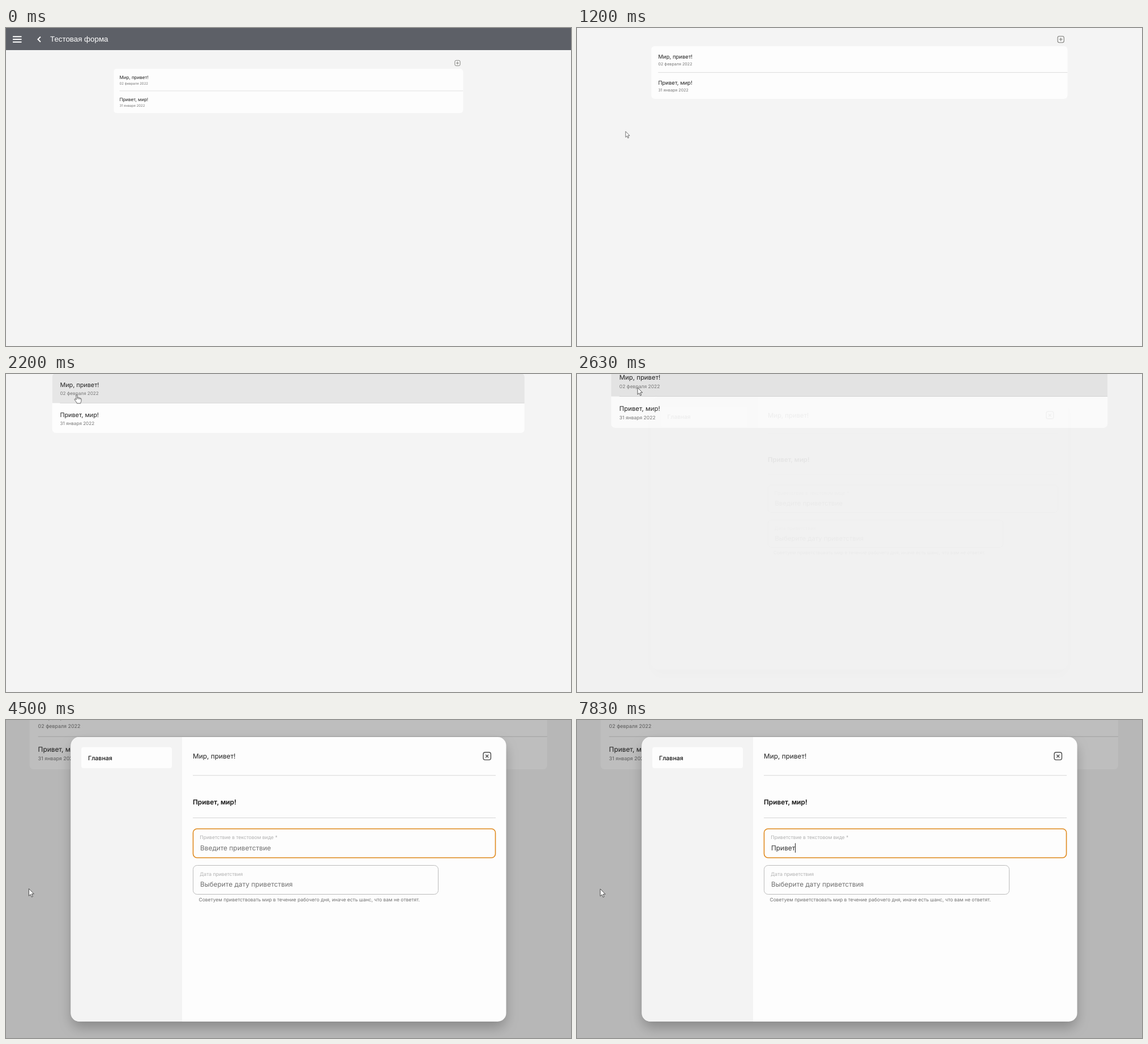
Write an HTML page that moves like this. It is 998x561 px and loops after 8 s.

```html
<!DOCTYPE html>
<html lang="ru">
<head>
<meta charset="utf-8">
<title>Тестовая форма</title>
<style>
  html, body { margin: 0; width: 100%; height: 100%; overflow: hidden; background: #f4f4f4; }
  svg { display: block; width: 998px; height: 561px; }
  text { font-family: Inter, "Open Sans", sans-serif; text-rendering: geometricPrecision; white-space: pre; }
  .title { font: 13.33px "Liberation Sans", Arial, sans-serif; fill: #fff; }
  .item { font-size: 8px; fill: #222; }
  .date { font-size: 6px; fill: #777; }
  .label { font-size: 8.6px; fill: #b0b0b0; }
  .hint { font-size: 11.9px; fill: #707070; }
  .line { stroke: #d6d6d6; }
  .box { fill: none; stroke: #bbb; }
</style>
</head>
<body>
<svg viewBox="0 0 998 561">
  <defs>
    <clipPath id="cardClip"><rect x="190.3" y="72" width="617" height="78" rx="5"/></clipPath>
    <clipPath id="modalClip"><rect x="114.5" y="30" width="769" height="502" rx="15"/></clipPath>
    <filter id="shadow" x="-10%" y="-10%" width="120%" height="125%">
      <feGaussianBlur stdDeviation="11"/>
    </filter>
  </defs>
  <rect width="998" height="561" fill="#f4f4f4"/>

  <g id="page">
    <rect width="998" height="39" fill="#5d6067"/>
    <path d="M12 15.2h15.5M12 20h15.5M12 24.8h15.5" stroke="#fff" stroke-width="1.9"/>
    <path d="M61 15.5l-4.6 4.5 4.6 4.5" fill="none" stroke="#fff" stroke-width="1.9"/>
    <text class="title" x="78" y="24">Тестовая форма</text>
    <g fill="none" stroke="#7c7c78" stroke-width=".9">
      <rect x="792.8" y="57.2" width="9.4" height="9.4" rx="2.4"/>
      <path d="M795 61.9h5M797.5 59.4v5"/>
    </g>
    <g clip-path="url(#cardClip)">
      <rect x="190" y="72" width="618" height="78" fill="#fdfdfd"/>
      <rect id="row0" x="190" y="72" width="618" height="39" fill="#e6e6e6"/>
      <rect id="row1" x="190" y="111" width="618" height="39" fill="#e6e6e6"/>
      <path class="line" d="M200.5 110.9H808" stroke-width=".7"/>
    </g>
    <text class="item" x="200.5" y="90">Мир, привет!</text>
    <text class="date" x="200.5" y="100.4">02 февраля 2022</text>
    <text class="item" x="200.5" y="129">Привет, мир!</text>
    <text class="date" x="200.5" y="139.4">31 января 2022</text>
  </g>

  <rect id="shade" width="998" height="561"/>

  <g id="modal">
    <rect x="116" y="42" width="766" height="500" rx="15" fill-opacity=".26" filter="url(#shadow)"/>
    <g clip-path="url(#modalClip)">
      <rect x="114" y="30" width="770" height="502" fill="#fdfdfd"/>
      <rect x="114" y="30" width="197" height="502" fill="#f3f3f3"/>
    </g>
    <rect x="133" y="48" width="160" height="37" rx="4" fill="#fdfdfd"/>
    <text x="145" y="70.6" font-size="10.6" font-weight="500" fill="#111">Главная</text>
    <text x="330" y="68" font-size="11.85" fill="#222">Мир, привет!</text>
    <g fill="none" stroke="#4a4a4a" stroke-width="1.4">
      <rect x="843" y="57" width="13.4" height="13.4" rx="3.4"/>
      <path d="M847.2 61.2l5 5m0-5l-5 5"/>
    </g>
    <path class="line" d="M330 97.8H865M330 172.6H865"/>
    <text x="330" y="149.2" font-size="11.85" font-weight="600" fill="#111">Привет, мир!</text>

    <rect id="field" class="box" x="330.5" y="192" width="534" height="51" rx="7"/>
    <text class="label" x="342.3" y="210.3">Приветствие в текстовом виде *</text>
    <text id="value" class="hint" x="343" y="229.8"></text>
    <path id="caret" stroke="#222"/>

    <rect class="box" x="330.5" y="256.5" width="433" height="51" rx="7"/>
    <text class="label" x="342.3" y="275">Дата приветствия</text>
    <text class="hint" x="343" y="294.3">Выберите дату приветствия</text>
    <text x="340.5" y="319.6" font-size="8.5" fill="#707070">Советуем приветствовать мир в течение рабочего дня, иначе есть шанс, что вам не ответят.</text>
  </g>

  <g id="mouse" fill="#fff" stroke="#333" stroke-width="1.1" stroke-linejoin="round">
    <path id="arrow" d="M0 0V16.5L3.8 13 6.4 19 9 17.9 6.4 12H11.6Z"/>
    <path id="hand" d="M-1.5 1.2C-1.5-.8 1.7-.8 1.7 1.2V7.5C2.4 6.2 4.8 6.4 5 8 6 7 8 7.3 8.2 9 9.3 8.2 11.2 8.8 11.2 10.4V15.5C11.2 18 9.6 18.6 9.4 21.5H.4C0 18.5-3.4 16-5.4 12.4-6.4 10.2-3.6 9.6-2.6 11.2L-1.5 12.6ZM1.7 7.5V11M5 8V11.3M8.2 9V11.6"/>
    <path id="beam" d="M-3-8H-1L0-7 1-8H3M0-7V7M-3 8H-1L0 7 1 8H3" fill="none"/>
  </g>
</svg>
<script>
const LOOP = 8000, CX = 499, CY = 280.5, ZOOM = 1.482;
const FADE = 2600, CLICK = 3970, BLINK = 500;
const WORD = 'Привет', KEYS = [5700, 6030, 6270, 6570, 6900, 7470];

// pointer track in unzoomed page units: time, x, y
const TRACK = [
  [640, -20, 392], [850, 40, 350], [1120, 140, 215], [1450, 221, 104],
  [1670, 221, 102.5], [2300, 222.5, 100], [2630, 223.2, 100], [2870, 220, 115.3],
  [3150, 300, 200], [3700, 447, 241], [4060, 449, 242], [4430, 189.5, 292], [4800, 190, 292.3]
];

const $ = id => document.getElementById(id);
const clamp = v => Math.min(1, Math.max(0, v));
const ease = v => v * v * (3 - 2 * v);
const ramp = (t, from, to) => ease(clamp((t - from) / (to - from)));
const show = (id, on) => $(id).setAttribute('visibility', on ? 'visible' : 'hidden');
const zoomTo = (id, k) =>
  $(id).setAttribute('transform', `translate(${CX} ${CY}) scale(${k}) translate(${-CX} ${-CY})`);

function pointer(t) {
  let i = 0;
  while (i < TRACK.length - 2 && t > TRACK[i + 1][0]) i++;
  const [t0, x0, y0] = TRACK[i], [t1, x1, y1] = TRACK[i + 1];
  const p = ramp(t, t0, t1);
  return [x0 + (x1 - x0) * p, y0 + (y1 - y0) * p];
}

function drawField(t) {
  const focused = t >= CLICK;
  const typed = KEYS.filter(k => t >= k).length;
  const value = $('value');
  value.textContent = typed ? WORD.slice(0, typed) : 'Введите приветствие';
  value.style.fill = typed ? '#333' : '';
  $('field').style.stroke = focused ? '#e08a1e' : '';
  $('field').style.strokeWidth = focused ? 1.6 : 1;

  const since = t - (typed ? KEYS[typed - 1] : CLICK);
  const x = 343.3 + (typed ? value.getComputedTextLength() : 0);
  $('caret').setAttribute('d', `M${x} 217.3V234`);
  show('caret', focused && Math.floor(since / BLINK) % 2 === 0);
}

function drawPointer(t, s) {
  const [x, y] = pointer(t);
  const overCard = t < FADE && x > 190 && x < 807 && y > 72 && y < 150;
  const overField = t > FADE + 200 && x > 385.5 && y > 221 && y < 255.5;
  show('hand', overCard);
  show('beam', overField);
  show('arrow', !overCard && !overField);
  $('mouse').setAttribute('transform',
    `translate(${CX + (x - CX) * s} ${CY + (y - CY) * s}) scale(${s * .52})`);

  $('row0').setAttribute('opacity', ramp(t, 1330, 1480) * (1 - ramp(t, 2630, 2800)));
  $('row1').setAttribute('opacity', overCard && y > 111 ? .6 : 0);
}

function draw(t) {
  const s = 1 + (ZOOM - 1) * clamp((t - 10) / 3000);
  zoomTo('page', s);
  zoomTo('modal', s / ZOOM);
  const open = ramp(t, FADE, FADE + 230);
  $('shade').setAttribute('opacity', open * .25);
  $('modal').setAttribute('opacity', open);
  drawField(t);
  drawPointer(t, s);
}

const start = performance.now();
function tick() {
  draw((performance.now() - start) % LOOP);
  requestAnimationFrame(tick);
}
draw(0);
requestAnimationFrame(tick);
</script>
</body>
</html>
```
